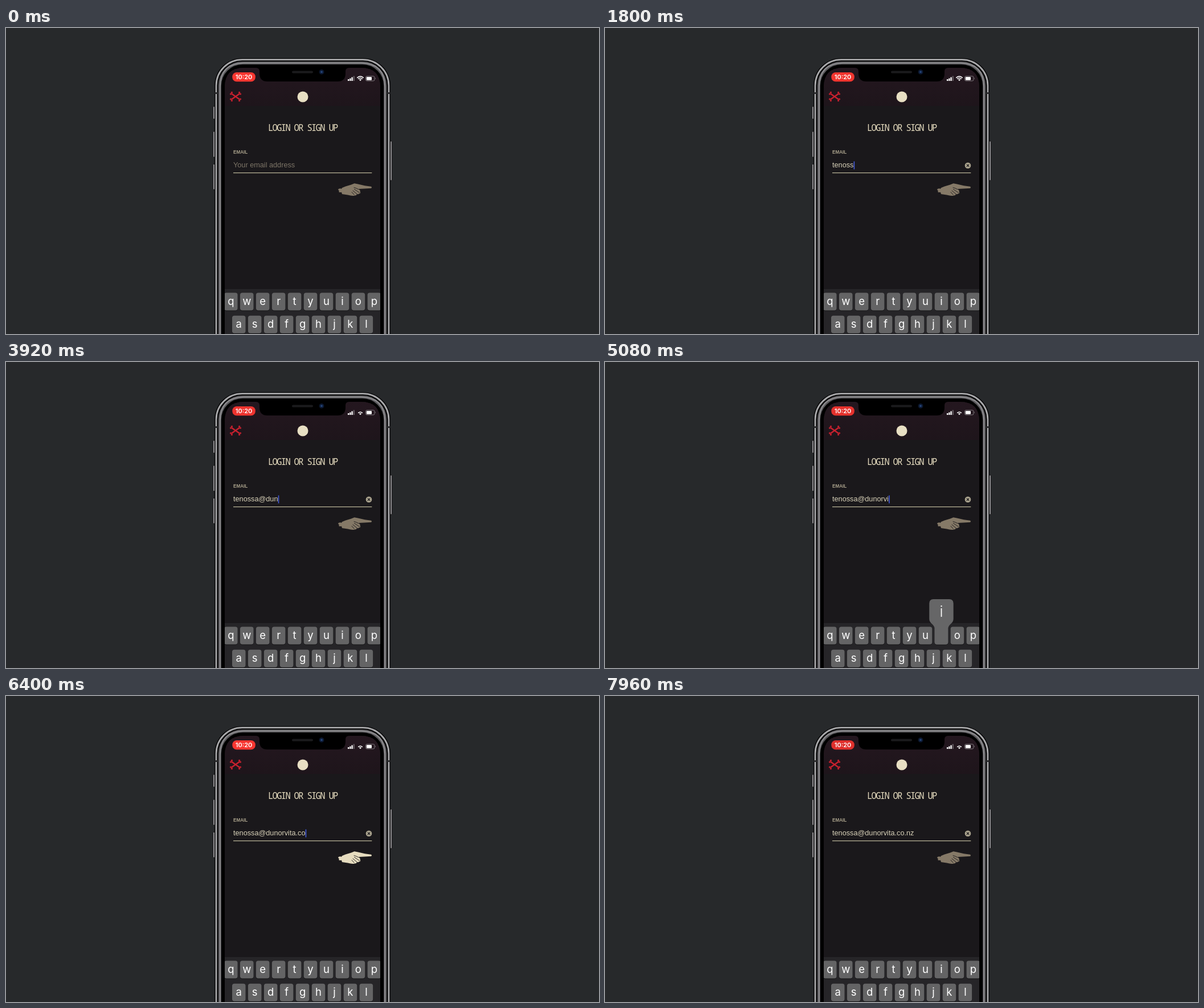
Write an HTML page that moves like this. It is 1041 px wide and 538 px high and loops after 8000 ms.

```html
<!DOCTYPE html>
<html lang="en">
<head>
<meta charset="utf-8">
<title>Login typing</title>
<style>
html, body { margin: 0; width: 100%; height: 100%; overflow: hidden; background: #27292b; }
svg { display: block; width: 1041px; height: 538px; }
text { font-family: "Liberation Sans", Arial, sans-serif; }
.ui { font-family: Inter, sans-serif; text-anchor: middle; fill: #fff; }
.title { font: 15.5px "Noto Sans Mono", monospace; letter-spacing: -1.7px; fill: #e6dcbf; }
.input { font-size: 12.7px; }
.line { fill: none; stroke-linecap: round; }
</style>
</head>
<body>
<svg viewBox="0 0 1041 538">
  <defs>
    <clipPath id="screen"><path d="M384 538V104Q384 70 418 70H623Q657 70 657 104V538Z"/></clipPath>
    <linearGradient id="header" x2="0" y2="1">
      <stop stop-color="#24171f"/><stop offset="1" stop-color="#1e151b"/>
    </linearGradient>
  </defs>

  <!-- Phone body -->
  <g fill="#929194" stroke="#101011" stroke-width=".8">
    <rect x="363.5" y="138" width="4" height="22" rx="1"/>
    <rect x="363.5" y="182" width="4" height="45" rx="1"/>
    <rect x="363.5" y="239.500" width="4" height="44.500" rx="1"/>
    <rect x="673.5" y="199" width="4" height="69" rx="1"/>
  </g>
  <rect x="366" y="53" width="309" height="600" rx="48" fill="#070708"/>
  <rect x="369" y="55.700" width="303" height="600" rx="45.500" fill="none" stroke="#a9a9ab" stroke-width="2.800"/>
  <rect x="375.300" y="61.500" width="290.400" height="600" rx="40" fill="none" stroke="#5b5a5d" stroke-width="5"/>
  <path d="M375.800 538V104Q375.800 62 418 61.500H623Q665.200 62 665.200 104V538" fill="none" stroke="#8c8b8e" stroke-width="2"/>
  <path d="M366.500 114.500H372M669 114.500H674.500" stroke="#2b2b2d" stroke-width="3"/>
  <rect x="378.500" y="65" width="284" height="600" rx="38" fill="#000"/>

  <g clip-path="url(#screen)">
    <rect x="384" y="70" width="273" height="468" fill="#1a181b"/>
    <rect x="384" y="70" width="273" height="67" fill="url(#header)"/>
    <rect x="384" y="459" width="273" height="79" fill="#262528"/>
    <g id="keys"></g>
    <g id="popup" fill="#666667">
      <path d="M-21.200 -41Q-21.200 -48.500 -14 -48.500H14Q21.200 -48.500 21.200 -41V-14Q21.200 -9 17 -5.500Q11.800 -1 11.800 3V27Q11.800 31 8 31H-8Q-11.800 31 -11.800 27V3Q-11.800 -1 -17 -5.500Q-21.200 -9 -21.200 -14Z"/>
      <text id="popupLetter" class="ui" y="-17.500" font-size="26" font-weight="300"></text>
    </g>
  </g>

  <!-- Notch and status bar -->
  <path d="M439 69V70Q445 70.500 445 76V80Q445 94 459 94H582Q596 94 596 80V76Q596 70.500 602 70V69Z"/>
  <rect x="502" y="75.500" width="37" height="4" rx="2" fill="#1b1b1d"/>
  <circle cx="554" cy="77.300" r="4.300" fill="#0d1a33"/>
  <circle cx="554" cy="77.300" r="1.800" fill="#25467c"/>
  <rect id="pill" x="397.300" y="78" width="40.500" height="16.300" rx="7.500"/>
  <text class="ui" x="417.600" y="90.200" font-size="11" font-weight="600">10:20</text>
  <g fill="#fff">
    <path d="M600 93V90h2.300v3zM603.200 93V88.500h2.300V93zM606.400 93V86.500h2.300V93z"/>
    <path d="M609.600 93V84.500h2.300V93z" opacity=".3"/>
    <path d="M622 93.200L619.900 90.800Q622 89.200 624.100 90.800Z"/>
    <path class="line" d="M618.600 89.300Q622 86.600 625.400 89.300" stroke="#fff" stroke-width="1.500"/>
    <path id="wifi" class="line" d="M616.700 87.300Q622 82.900 627.300 87.300" stroke="#fff" stroke-width="1.500"/>
    <rect x="631.500" y="84.700" width="15.500" height="8.300" rx="2.300" fill="none" stroke="#8b858a" stroke-width=".9"/>
    <rect x="632.800" y="86" width="9.200" height="5.700" rx="1.200"/>
    <path d="M648 87.300q1.500 1.500 0 3z" opacity=".5"/>
  </g>

  <!-- Header -->
  <g id="bones" fill="#c9212f" stroke="#c9212f"></g>
  <circle cx="521" cy="121" r="9.500" fill="#e8dfc3"/>

  <!-- Form -->
  <text class="title" x="460" y="181">LOGIN OR SIGN UP</text>
  <text x="399" y="220.600" font-size="8.150" font-weight="700" fill="#a9a18b">EMAIL</text>
  <text id="hint" class="input" x="399" y="245" fill="#7d7567">Your email address</text>
  <text id="email" class="input" x="399" y="245" fill="#d9d2b9"></text>
  <rect id="caret" y="234.500" width="1.600" height="14" fill="#435bdc"/>
  <path d="M399 254.700H642.300" stroke="#b9b598" stroke-width="1.300"/>
  <g id="clear">
    <circle cx="637" cy="241.700" r="5.300" fill="#aaa38e"/>
    <path class="line" d="M635.200 239.900l3.600 3.600m0 -3.600l-3.600 3.600" stroke="#1a181b" stroke-width="1.200"/>
  </g>
  <g id="hand">
    <path d="M583.500 283L587 282Q589 284 590 281L596 278.500L606 275.500L611.500 273.200L617 274.300L630 277.200L641 278.800Q643 280.200 641 281.700L628 282.500L618.500 283Q623 286 621.500 288Q623.500 290.500 620 291.200Q618.500 292.800 616 292Q615.500 294.800 612 294.500Q608 296 600 293.600L590 292L589 288.700L586 289Q583 288.300 585 286.300Q582.500 285 583.500 283Z"/>
    <path class="line" d="M611 280.500Q615 281.500 618.500 283.500M611.500 283.500L620.500 289.500M609 286L616 291.800M607 288.500L611 293" stroke="#1a181b" stroke-width=".9"/>
  </g>
</svg>
<script>
const LOOP = 8000, PITCH = 27.95;
const address = "tenossa@dunorvita.co.nz";
const typedAt = [560, 880, 1130, 1370, 1520, 1640, 2250, 2700, 3050, 3350, 3650, 4150,
  4420, 4760, 5020, 5560, 5780, 5940, 6060, 6220, 6520, 6720, 6980];
const $ = id => document.getElementById(id);
const show = (id, on) => $(id).setAttribute("visibility", on ? "visible" : "hidden");

function add(parent, tag, attrs, text = "") {
  const node = document.createElementNS("http://www.w3.org/2000/svg", tag);
  for (const name in attrs) node.setAttribute(name, attrs[name]);
  node.textContent = text;
  parent.append(node);
}

const keys = {};
["qwertyuiop", "asdfghjkl", "zxcvbnm"].forEach((letters, row) => {
  [...letters].forEach((letter, col) => {
    const x = 394.8 + PITCH * (col + [0, 0.5, 1.5][row]), y = 465.5 + 40.2 * row;
    keys[letter] = [x, y];
    const box = { x: x - 11.8, width: 23.6, height: 31, rx: 4 };
    add($("keys"), "rect", { ...box, y: y + 1, fill: "#151517" });
    add($("keys"), "rect", { ...box, y, fill: "#646465" });
    add($("keys"), "text", { class: "ui", x, y: y + 21, "font-size": 18.5 }, letter);
  });
});

// Two crossed bones, each with a pair of knobs per end
for (const s of [1, -1]) {
  add($("bones"), "path", { d: `M396 ${120.5 - 5 * s}L410 ${120.5 + 5 * s}`, "stroke-width": 2.3 });
  for (const e of [1, -1]) {
    const x = 403 + 8 * e, y = 120.5 + 5.7 * e * s;
    add($("bones"), "circle", { cx: x + 0.5 * e, cy: y - 1.2 * e * s, r: 1.6, stroke: "none" });
    add($("bones"), "circle", { cx: x - 1.4 * e, cy: y + 1.5 * e * s, r: 1.6, stroke: "none" });
  }
}

function draw(t) {
  const count = typedAt.filter(time => time <= t).length;
  $("email").textContent = address.slice(0, count);
  show("hint", !count);
  show("clear", count);
  $("clear").setAttribute("opacity", Math.min(1, 0.5 + (t - typedAt[0]) / 800));

  const idle = t - (count ? typedAt[count - 1] : -700);
  show("caret", idle % 1000 < 520);
  $("caret").setAttribute("x", 399.2 + (count ? $("email").getComputedTextLength() : 0));

  const pressed = address[typedAt.findIndex(time => t >= time - 100 && t < time + 80)];
  const key = keys[pressed];
  show("popup", key);
  if (key) {
    $("popup").setAttribute("transform", `translate(${key})`);
    $("popupLetter").textContent = pressed;
  }

  const ready = (t >= 6300 && t < 6540) || (t >= 7040 && t < 7800);
  $("hand").setAttribute("fill", ready ? "#e6dcbf" : "#857967");
  show("wifi", t < 2500);

  const glow = 0.5 + 0.5 * Math.cos(2 * Math.PI * t / 2200);
  $("pill").setAttribute("fill", `rgb(${218 + 34 * glow},${47 + 8 * glow},${43 + 6 * glow})`);
}

function tick() {
  draw(performance.now() % LOOP);
  requestAnimationFrame(tick);
}
tick();
</script>
</body>
</html>
```
